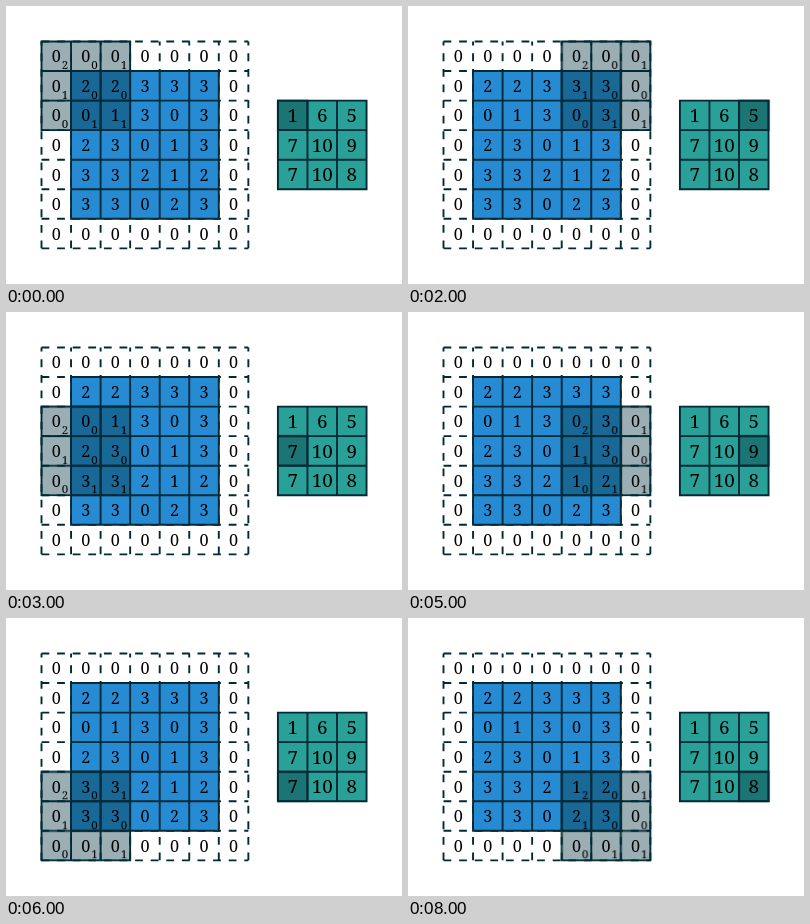
Write an HTML page that moves like this. It is 396 px wide and 278 px high and loops after 9 s.

```html
<!DOCTYPE html>
<html lang="en">
<head>
<meta charset="utf-8">
<title>Strided convolution</title>
<style>
  html, body { margin: 0; width: 100%; height: 100%; overflow: hidden; background: #fff; }
  svg { display: block; width: 396px; height: 278px; }
  text { font-family: "Noto Serif", "Liberation Serif", serif; text-anchor: middle; }
  .grid { fill: none; stroke: #002b36; stroke-width: 1.9; stroke-linecap: square; }
  .dashed { stroke-linecap: butt; stroke-dasharray: 7.8; }
  .shade { fill: #073642; fill-opacity: .4; }
</style>
</head>
<body>
<svg id="stage" viewBox="0 0 396 278"></svg>
<script>
const CELL = 29.55, LEFT = 35.5, TOP = 35.5;
const STEP_MS = 1000, STRIDE = 2;
const INPUT = ["22333", "01303", "23013", "33212", "33023"];
const KERNEL = ["201", "100", "011"];
const OUTPUT = [[1, 6, 5], [7, 10, 9], [7, 10, 8]];

const stage = document.getElementById("stage");
const px = col => LEFT + col * CELL;
const py = row => TOP + row * CELL;

function add(parent, tag, attrs = {}) {
  const el = document.createElementNS("http://www.w3.org/2000/svg", tag);
  for (const key in attrs) el.setAttribute(key, attrs[key]);
  return parent.appendChild(el);
}

function square(parent, col, row, n, attrs) {
  add(parent, "rect", { x: px(col), y: py(row), width: n * CELL, height: n * CELL, ...attrs });
}

// Lines run rightwards and upwards, so dashes start at the lower left
function grid(parent, col, row, n, type = "grid") {
  let d = "";
  for (let i = 0; i <= n; i++) {
    d += `M${px(col)} ${py(row + i)}h${n * CELL}M${px(col + i)} ${py(row + n)}v${-n * CELL}`;
  }
  add(parent, "path", { d, class: type });
}

function label(parent, value, col, row, size) {
  add(parent, "text", { x: px(col), y: py(row) + size * .357 + .3, "font-size": size })
    .textContent = value;
}

grid(stage, 0, 0, 7, "grid dashed");
square(stage, 1, 1, 5, { fill: "#268bd2" });
grid(stage, 1, 1, 5);
square(stage, 8, 2, 3, { fill: "#2aa198" });
grid(stage, 8, 2, 3);

const kernel = add(stage, "g");
square(kernel, 0, 0, 3, { class: "shade" });
grid(kernel, 0, 0, 3);
KERNEL.forEach((line, r) => [...line].forEach((v, c) =>
  label(kernel, v, c + .79, r + .78, 11.5)));

const marker = add(stage, "g");
square(marker, 8, 2, 1, { class: "shade" });
grid(marker, 8, 2, 1);

for (let r = 0; r < 7; r++) {
  for (let c = 0; c < 7; c++) {
    label(stage, INPUT[r - 1]?.[c - 1] ?? "0", c + .5, r + .5, 16.2);
  }
}
OUTPUT.forEach((line, r) => line.forEach((v, c) =>
  label(stage, v, c + 8.5, r + 2.5, 18.8)));

// Visit the 3 x 3 positions row by row, jumping between them
function scan(el, stride) {
  const frames = [];
  for (let i = 0; i <= 9; i++) {
    const k = Math.min(i, 8), d = stride * CELL;
    frames.push({
      offset: i / 9,
      easing: "steps(1, end)",
      transform: `translate(${(k % 3) * d}px, ${Math.floor(k / 3) * d}px)`
    });
  }
  el.animate(frames, { duration: 9 * STEP_MS, iterations: Infinity });
}
scan(kernel, STRIDE);
scan(marker, 1);
</script>
</body>
</html>
```
